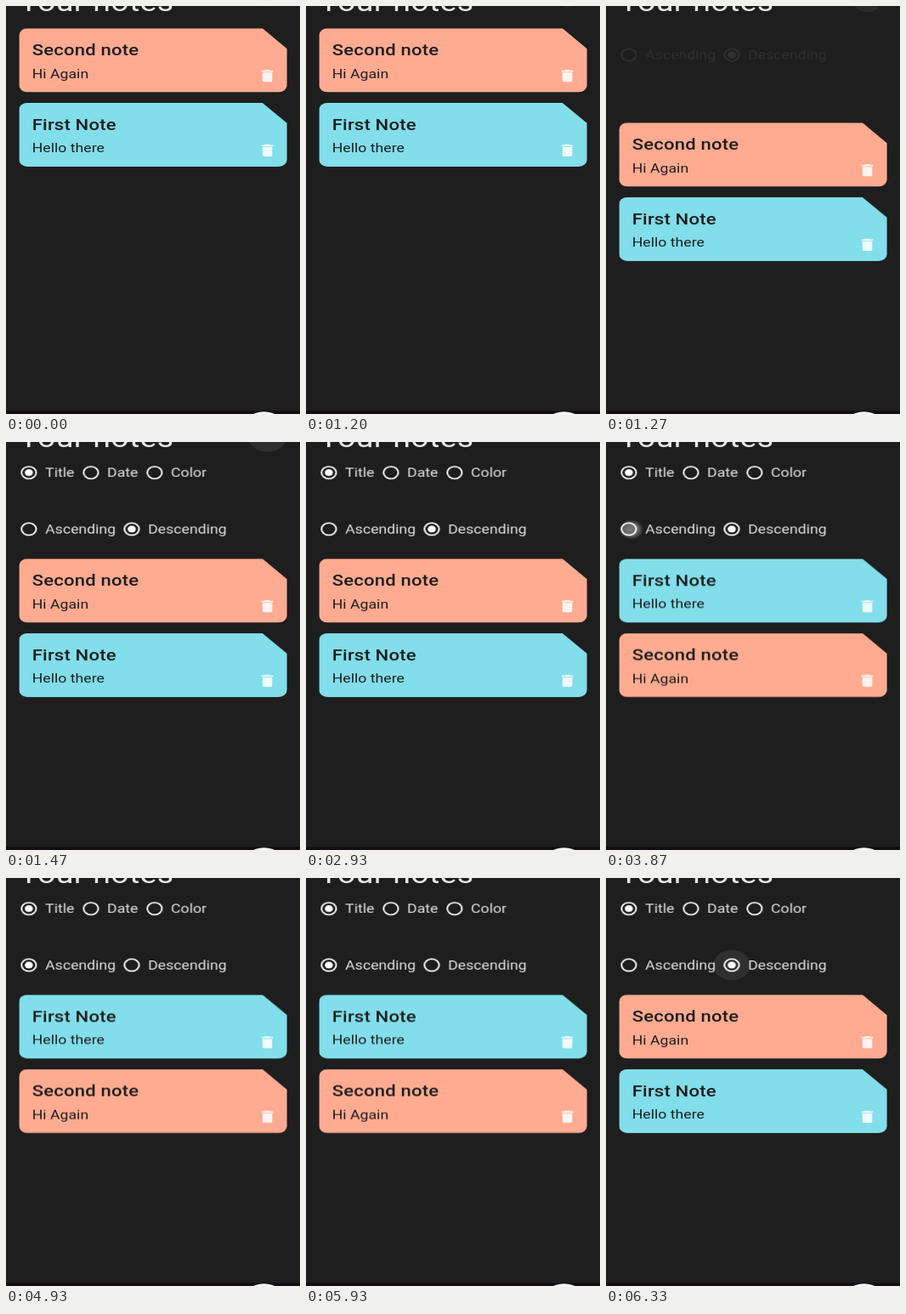
Write an HTML page that moves like this. It is 346x480 px and loops after 6.39 s.

```html
<!DOCTYPE html>
<html lang="en">
<head>
<meta charset="utf-8">
<title>Notes</title>
<style>
  html, body { margin: 0; width: 100%; height: 100%; overflow: hidden; background: #1e1e1e; }
  svg { display: block; width: 100vw; height: 100vh; font: 18.4px Roboto, sans-serif; }

  .heading { font-size: 39.1px; letter-spacing: .29px; fill: #e9e9e9; }
  .label { fill: #e2e2e2; }
  .title { font-size: 23px; font-weight: 500; letter-spacing: .17px; }
  .card text { fill: #1e1e1e; }
  .bin { fill: #fff; opacity: .87; }
  .ring { fill: none; stroke: #fff; stroke-width: 2; }
  .dot { fill: #fff; }
  .ripple { fill: #fff; }
  .dot, .ripple, .glow { transform-box: fill-box; transform-origin: center; }

  .anim { animation: 6390ms linear infinite; }
  .jump { animation-timing-function: step-end; }
  #notes { animation-name: open; }
  #second { animation-name: second; }
  #first { animation-name: first; }
  #order { animation-name: reveal; }
  #ascDot { animation-name: ascDot; }
  #descDot { animation-name: descDot; }
  #sortRipple { animation-name: sortRipple; }
  #ascRipple { animation-name: ascRipple; }
  #ascGlow { animation-name: ascGlow; }
  #descRipple { animation-name: descRipple; }

  @keyframes open {
    0% { transform: translateY(33.1px); }
    19.8%, 100% { transform: translateY(172.8px); }
  }
  @keyframes second {
    0%, 93.35%, 100% { transform: translateY(0); }
    60.02% { transform: translateY(110.3px); }
  }
  @keyframes first {
    0%, 93.35%, 100% { transform: translateY(110.3px); }
    60.02% { transform: translateY(0); }
  }
  @keyframes reveal {
    0%, 19.8% {
      opacity: 0; transform: translateY(-62px);
      animation-timing-function: cubic-bezier(.2, .6, .3, 1);
    }
    22.93%, 100% { opacity: 1; transform: none; }
  }
  @keyframes ascDot {
    0%, 61.35%, 95.62%, 100% { transform: scale(0); }
    62.6%, 94.05% { transform: scale(1); }
  }
  @keyframes descDot {
    0%, 61.35%, 95.62%, 100% { transform: scale(1); }
    62.6%, 94.05% { transform: scale(0); }
  }
  @keyframes sortRipple {
    0%, 18.78% { transform: scale(.48); opacity: .035; }
    20.81%, 23.47% { transform: scale(1); opacity: .08; }
    28.95%, 100% { transform: scale(1); opacity: 0; }
  }
  @keyframes ascRipple {
    0%, 60.56% { transform: scale(.5); opacity: 0; }
    61.58%, 62.6% { transform: scale(1); opacity: .08; }
    67.3%, 100% { transform: scale(1); opacity: 0; }
  }
  @keyframes ascGlow {
    0%, 60.02% { transform: scale(.8); opacity: 0; }
    60.5%, 60.7% { transform: scale(1); opacity: 1; }
    61.58%, 100% { transform: scale(1.45); opacity: 0; }
  }
  @keyframes descRipple {
    0%, 93.74% { transform: scale(.3); opacity: 0; }
    95.46%, 100% { transform: scale(1); opacity: .08; }
  }
</style>
</head>
<body>
<!-- A 360-unit-wide phone screen, squeezed to the stage -->
<svg viewBox="0 0 360 604" preserveAspectRatio="none">
  <defs>
    <path id="paper" d="M26 0H314L344 30V84.3a10 10 0 0 1-10 10H26a10 10 0 0 1-10-10V10a10 10 0 0 1 10-10z"/>
    <path id="bin" class="bin" transform="translate(308 58.3)"
      d="M6 19c0 1.1.9 2 2 2h8c1.1 0 2-.9 2-2V7H6zM19 4h-3.5l-1-1h-5l-1 1H5v2h14z"/>
    <circle id="ring" class="ring" r="9"/>
    <radialGradient id="soft">
      <stop offset="0" stop-color="#fff" stop-opacity=".4"/>
      <stop offset=".55" stop-color="#fff" stop-opacity=".34"/>
      <stop offset="1" stop-color="#fff" stop-opacity="0"/>
    </radialGradient>
  </defs>

  <rect width="360" height="604" fill="#1e1e1e"/>
  <circle id="sortRipple" class="ripple anim" cx="320" cy="-9.4" r="24"/>
  <text class="heading" x="16" y="7.5">Your notes</text>

  <g id="order" class="anim">
    <g class="label" transform="translate(0 45.3)">
      <use href="#ring" x="28"/><circle class="dot" cx="28" r="5"/>
      <text x="48" y="6.7">Title</text>
      <use href="#ring" x="104"/><text x="124" y="6.7">Date</text>
      <use href="#ring" x="182"/><text x="202" y="6.7">Color</text>
    </g>
    <g class="label" transform="translate(0 128.9)">
      <circle id="ascRipple" class="ripple anim" cx="28" r="22"/>
      <circle id="ascGlow" class="glow anim" cx="31" cy=".6" r="15" fill="url(#soft)"/>
      <use href="#ring" x="28"/><circle id="ascDot" class="dot anim" cx="28" r="5"/>
      <text x="48" y="6.7">Ascending</text>
      <circle id="descRipple" class="ripple anim" cx="154" r="22.5"/>
      <use href="#ring" x="154"/><circle id="descDot" class="dot anim" cx="154" r="5"/>
      <text x="174" y="6.7">Descending</text>
    </g>
  </g>

  <g id="notes" class="anim jump">
    <g id="second" class="card anim jump">
      <use href="#paper" fill="#ffab91"/>
      <text class="title" x="32" y="40">Second note</text>
      <text x="32" y="73.5">Hi Again</text>
      <use href="#bin"/>
    </g>
    <g id="first" class="card anim jump">
      <use href="#paper" fill="#81deea"/>
      <text class="title" x="32" y="40">First Note</text>
      <text x="32" y="73.5">Hello there</text>
      <use href="#bin"/>
    </g>
  </g>

  <rect y="599.5" width="360" height="4.5" fill="#140e12"/>
  <circle cx="316" cy="628.6" r="28" fill="#fff"/>
</svg>
</body>
</html>
```
